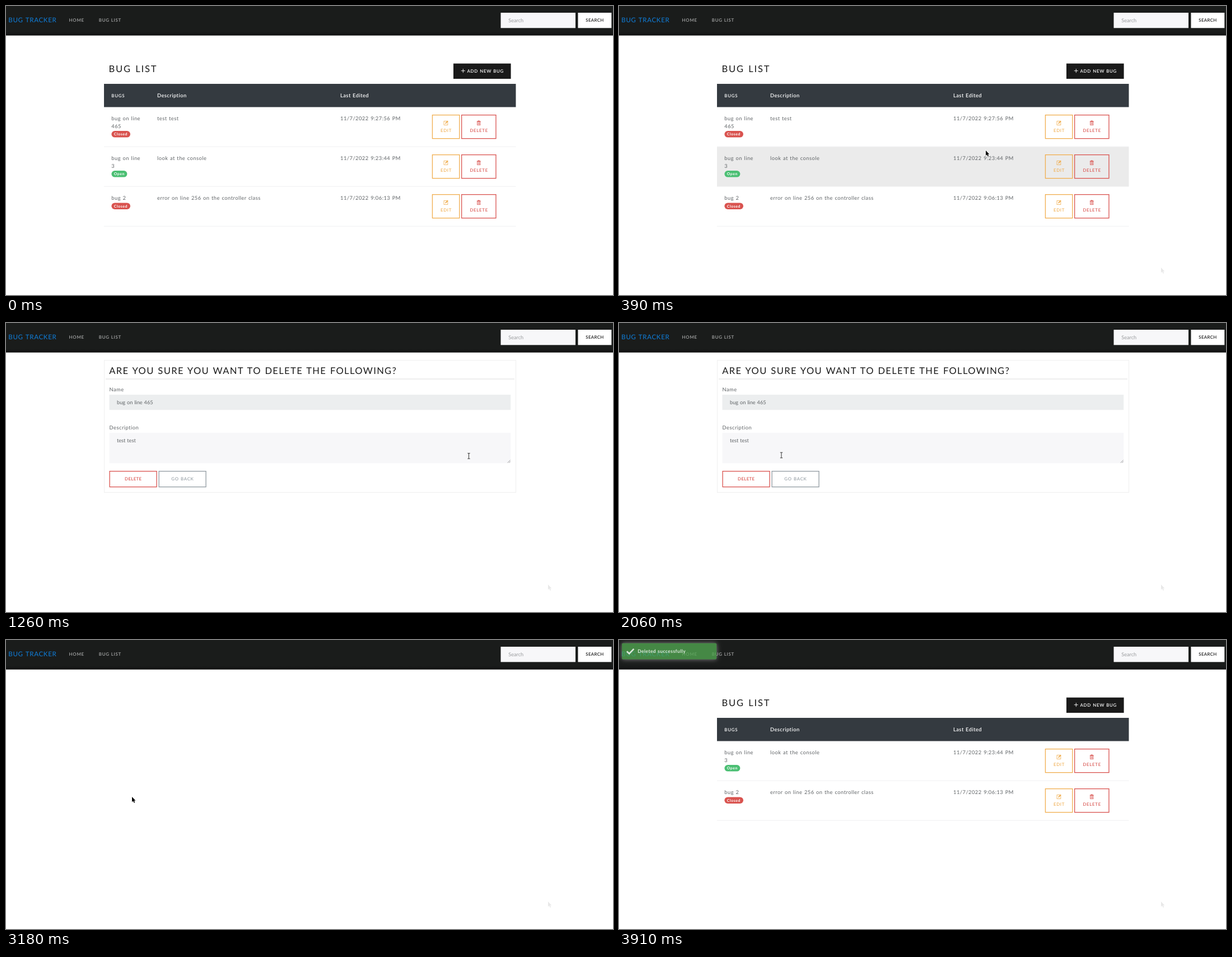
An HTML page with a canvas that plays this animation: 1084x516 px, repeating every 4370 ms.

```html
<!DOCTYPE html>
<html lang="en">
<head>
<meta charset="utf-8">
<title>Bug Tracker</title>
<style>
  html, body { margin: 0; width: 100%; height: 100%; overflow: hidden; background: #fff; }
  canvas { display: block; width: 1084px; height: 516px; }
</style>
</head>
<body>
<canvas id="stage" width="1084" height="516"></canvas>
<script>
const ctx = document.getElementById('stage').getContext('2d');
const LOOP = 4370, FIRST_STEP = 190, STEP = 66.42;
const OPEN_FORM = 1115, SHOW_FORM = 1180, SUBMIT = 3110, SHOW_RESULT = 3240;
const RED = '#d9534f', ORANGE = '#f0ad4e', GREEN = '#4bbf73', GREY = '#919aa1';
const INK = '#1a1a1a', BODY = '#5f6366', FIELD = '#f7f7f9', WHITE = '#fff';
const LEFT = 175, WIDTH = 735.5, LINE = 13.6, ROW = 71;

const STYLE = {
  brand: { size: 11.6, spacing: 0.65 },
  title: { size: 16.5, spacing: 1.85 },
  question: { size: 16.5, spacing: 1.38 },
  body: { size: 9.3, spacing: 0.5 },
  strong: { size: 9.3, spacing: 0.45, weight: 600 },
  field: { size: 9.2, spacing: 0 },
  caps: { size: 7.8, spacing: 0.75, weight: 500 },
  capsBold: { size: 7.9, spacing: 0.7, weight: 600 },
  capsTight: { size: 7.8, spacing: 0.38, weight: 600 },
  badge: { size: 6.8, spacing: 0.6, weight: 700 },
  toast: { size: 8.6, spacing: 0.36, weight: 700 }
};

const BUGS = [
  { name: ['bug on line', '465'], text: 'test test', date: '11/7/2022 9:27:56 PM', status: 'Closed' },
  { name: ['bug on line', '3'], text: 'look at the console', date: '11/7/2022 9:23:44 PM', status: 'Open' },
  { name: ['bug 2'], text: 'error on line 256 on the controller class', date: '11/7/2022 9:06:13 PM', status: 'Closed' }
];

// Pointer moves; "bend" is the control point of a curved move
const ENTRY = { x: 968, y: 467 };
const MOVES = [
  { from: 190, until: 390, x: 655, y: 258 },
  { from: 390, until: 726, x: 848, y: 225 },
  { from: 1190, until: 1730, x: 283, y: 127, bend: { x: 560, y: 400 } },
  { from: 1730, until: 2050, x: 290, y: 236 },
  { from: 2200, until: 2515, x: 222, y: 274 },
  { from: 3080, until: 3110, x: 225, y: 280 },
  { from: 3240, until: 3577, x: 390, y: 310 },
  { from: 3577, until: 3909, x: 910, y: 525 }
];

const clamp = v => Math.min(1, Math.max(0, v));
const smooth = k => k * k * (3 - 2 * k);
const mix = (a, b, k) => a + (b - a) * k;
const mixPoint = (a, b, k) => ({ x: mix(a.x, b.x, k), y: mix(a.y, b.y, k) });

function pointerAt(t) {
  if (t < MOVES[0].from || t > MOVES.at(-1).until) return null;
  let point = ENTRY;
  for (const move of MOVES) {
    if (t < move.from) break;
    const k = smooth(clamp((t - move.from) / (move.until - move.from)));
    const bend = move.bend || mixPoint(point, move, 0.5);
    point = mixPoint(mixPoint(point, bend, k), mixPoint(bend, move, k), k);
  }
  return point;
}

const inside = (p, x, y, w, h) => !!p && p.x >= x && p.x < x + w && p.y >= y && p.y < y + h;

function rect(x, y, w, h, color) {
  ctx.fillStyle = color;
  ctx.fillRect(x, y, w, h);
}

function pill(x, y, w, h, r, color) {
  ctx.fillStyle = color;
  ctx.beginPath();
  ctx.roundRect(x, y, w, h, r);
  ctx.fill();
}

function frame(x, y, w, h, color, width) {
  ctx.strokeStyle = color;
  ctx.lineWidth = width;
  ctx.strokeRect(x + width / 2, y + width / 2, w - width, h - width);
}

function line(color, width, ...points) {
  ctx.strokeStyle = color;
  ctx.lineWidth = width;
  ctx.beginPath();
  points.forEach(([x, y]) => ctx.lineTo(x, y));
  ctx.stroke();
}

function at(x, y, paint) {
  ctx.save();
  ctx.translate(x, y);
  paint();
  ctx.restore();
}

// y is the middle of the capitals
function label(str, x, y, style, color, align = 'left') {
  const { size, spacing, weight = 400 } = STYLE[style];
  ctx.font = `${weight} ${size}px Lato, "Open Sans", sans-serif`;
  ctx.letterSpacing = spacing + 'px';
  ctx.wordSpacing = size * 0.065 + 'px';
  ctx.textAlign = align;
  ctx.fillStyle = color;
  ctx.fillText(str, x + (align === 'center' ? spacing / 2 : 0), y + size * 0.36);
}

function pencilIcon(color) {
  frame(-4, -3.6, 7.6, 7.6, color, 0.8);
  line(color, 1.8, [-1, 1], [3.4, -3.4]);
}

function trashIcon(color) {
  line(color, 0.9, [-3.5, -2.8], [3.5, -2.8]);
  frame(-1.5, -4.3, 3, 1.8, color, 0.7);
  frame(-3, -2.8, 6, 7, color, 0.8);
  for (const x of [-1.1, 0, 1.1]) line(color, 0.6, [x, -1.4], [x, 2.7]);
}

// Returns whether the pointer is over the button
function outlineButton(text, x, y, w, h, color, pointer, icon, style = 'caps') {
  const hover = inside(pointer, x, y, w, h), ink = hover ? WHITE : color;
  if (hover) rect(x, y, w, h, color);
  frame(x, y, w, h, color, 1.3);
  const middle = x + w / 2;
  if (icon) at(middle, y + h / 2 - LINE / 2, () => icon(ink));
  label(text, middle, y + h / 2 + (icon ? LINE / 2 : 0), style, ink, 'center');
  return hover;
}

function navbar() {
  rect(0, 0, 1084, 52.5, '#1a1c1b');
  const shade = ctx.createLinearGradient(0, 46, 0, 52.5);
  shade.addColorStop(0, 'rgba(15,15,15,0)');
  shade.addColorStop(1, 'rgba(15,15,15,.8)');
  rect(0, 46, 1084, 6.5, shade);
  label('BUG TRACKER', 4.3, 25, 'brand', '#0f7fdc');
  label('HOME', 112.6, 25.6, 'capsBold', '#a9aaaa');
  label('BUG LIST', 165.8, 25.6, 'capsBold', '#a9aaaa');
  rect(883.5, 12, 133.5, 27.3, FIELD);
  label('Search', 897.2, 25.6, 'field', '#999b9d');
  rect(1021.5, 12, 59.8, 27.3, WHITE);
  label('SEARCH', 1051.3, 25.3, 'capsTight', INK, 'center');
}

function bugRow(bug, y, pointer) {
  if (inside(pointer, LEFT, y, WIDTH, ROW)) rect(LEFT, y, WIDTH, ROW, '#ebebeb');
  else rect(LEFT, y + ROW - 0.8, WIDTH, 1, '#eff0f1');

  const first = y + 20.2;
  bug.name.forEach((part, i) => label(part, 188.3, first + i * LINE, 'body', BODY));
  const open = bug.status === 'Open', badgeY = first + bug.name.length * LINE + 0.9;
  pill(188.4, badgeY - 5.8, open ? 28 : 33.6, 11.6, 5.8, open ? GREEN : RED);
  label(bug.status, 192.8, badgeY, 'badge', WHITE);
  label(bug.text, 270, first, 'body', BODY);
  label(bug.date, 597, first, 'body', BODY);

  const edit = outlineButton('EDIT', 760.8, y + 13.5, 49.7, 43.3, ORANGE, pointer, pencilIcon);
  const remove = outlineButton('DELETE', 813, y + 13.5, 62.6, 43.3, RED, pointer, trashIcon);
  return edit || remove;
}

function listPage(bugs, pointer) {
  label('BUG LIST', 183.6, 111.8, 'title', INK);
  rect(799, 102.7, 102.6, 27.3, INK);
  line(WHITE, 0.9, [812.8, 115.7], [819.8, 115.7]);
  line(WHITE, 0.9, [816.3, 112.2], [816.3, 119.2]);
  label('ADD NEW BUG', 823.5, 116, 'capsBold', WHITE);
  rect(LEFT, 139, WIDTH, 41.5, '#343a40');
  label('BUGS', 188.3, 160, 'capsBold', WHITE);
  label('Description', 270, 159.6, 'strong', WHITE);
  label('Last Edited', 597, 159.6, 'strong', WHITE);
  const hovers = bugs.map((bug, i) => bugRow(bug, 180.5 + i * ROW, pointer));
  return hovers.includes(true) ? 'hand' : 'arrow';
}

// Returns whether the pointer is over the field
function formField(name, value, y, h, color, pointer) {
  const x = 184.5, w = 716.7;
  label(name, x, y - 9.5, 'body', BODY);
  rect(x, y, w, h, color);
  label(value, x + 13.5, y + 13.4, 'field', BODY);
  return inside(pointer, x, y, w, h);
}

function formPage(pointer) {
  frame(LEFT, 66, WIDTH + 0.5, 237, '#efefef', 1);
  label('ARE YOU SURE YOU WANT TO DELETE THE FOLLOWING?', 184.3, 85, 'question', INK);
  rect(178, 99.5, 730, 1, '#dedede');
  const overName = formField('Name', 'bug on line 465', 128, 27.2, '#eceeef', pointer);
  const overText = formField('Description', 'test test', 196, 54.3, FIELD, pointer);
  for (const d of [2.4, 5]) line('#8a8a8a', 0.8, [900.7 - d, 249.6], [900.7, 249.6 - d]);

  const remove = outlineButton('DELETE', 184.5, 264, 85.2, 29.3, RED, pointer, null, 'capsTight');
  const back = outlineButton('GO BACK', 272.5, 264, 85.2, 29.3, GREY, pointer);
  if (remove || back) return 'hand';
  return overName || overText ? 'beam' : 'arrow';
}

function toast(opacity) {
  const box = [5.2, 5.8, 169, 28.8, 2];
  ctx.save();
  ctx.globalAlpha = opacity;
  ctx.save();
  ctx.beginPath();
  ctx.rect(0, 0, 200, 60);
  ctx.roundRect(...box);
  ctx.clip('evenodd');
  ctx.shadowColor = '#999';
  ctx.shadowBlur = 8;
  pill(...box, '#999');
  ctx.restore();
  pill(...box, '#51a351');
  line(WHITE, 2.6, [14, 20.3], [18.2, 24.3], [26.5, 15.8]);
  label('Deleted successfully', 33.2, 20.3, 'toast', WHITE);
  ctx.restore();
}

const CURSORS = {
  arrow() {
    const path = new Path2D('M0 0V9.2L2.1 7.3L3.6 10.8L5.2 10.1L3.7 6.7H6.4Z');
    ctx.lineWidth = 1.2;
    ctx.strokeStyle = WHITE;
    ctx.stroke(path);
    ctx.fillStyle = '#000';
    ctx.fill(path);
  },
  beam() {
    line('#333', 1, [0, -4.5], [0, 4.5]);
    for (const y of [-4.8, 4.8]) line('#333', 1, [-2.2, y], [2.2, y]);
  },
  hand() {
    // Dark silhouette first, then the same shapes smaller in white
    for (const [grow, color] of [[0.5, '#111'], [-0.4, WHITE]]) {
      const part = (x, y, w, h) => pill(x - grow, y - grow, w + 2 * grow, h + 2 * grow, 1, color);
      part(-3.8, 6.8, 3, 3.6);
      part(-2, 6, 7, 5.8);
      for (let i = 0; i < 4; i++) part(i * 1.7 - 1, i ? 4 + i * 0.4 : -0.6, 1.8, i ? 4 : 8);
    }
  }
};

function cursor({ x, y }, shape, alpha = 1) {
  at(x, y, () => {
    ctx.globalAlpha = alpha;
    CURSORS[shape]();
  });
}

function draw(time) {
  const t = time < FIRST_STEP ? time : FIRST_STEP + Math.floor((time - FIRST_STEP) / STEP) * STEP;
  const pointer = pointerAt(t);
  let shape = 'arrow';

  rect(0, 0, 1084, 516, WHITE);
  navbar();
  if (t < OPEN_FORM) shape = listPage(BUGS, pointer);
  else if (t >= SHOW_FORM && t < SUBMIT) shape = formPage(pointer);
  else if (t >= SHOW_RESULT) shape = listPage(BUGS.slice(1), pointer);

  // Faint trace where the pointer came in
  if (t > FIRST_STEP) cursor(ENTRY, 'arrow', 0.09);

  const fade = clamp((t - SHOW_RESULT) / 300);
  if (fade > 0) toast(0.8 * smooth(fade));
  if (pointer) cursor(pointer, shape);
}

ctx.textRendering = 'geometricPrecision';
const start = performance.now();
function tick() {
  draw((performance.now() - start) % LOOP);
  requestAnimationFrame(tick);
}
tick();
</script>
</body>
</html>
```
